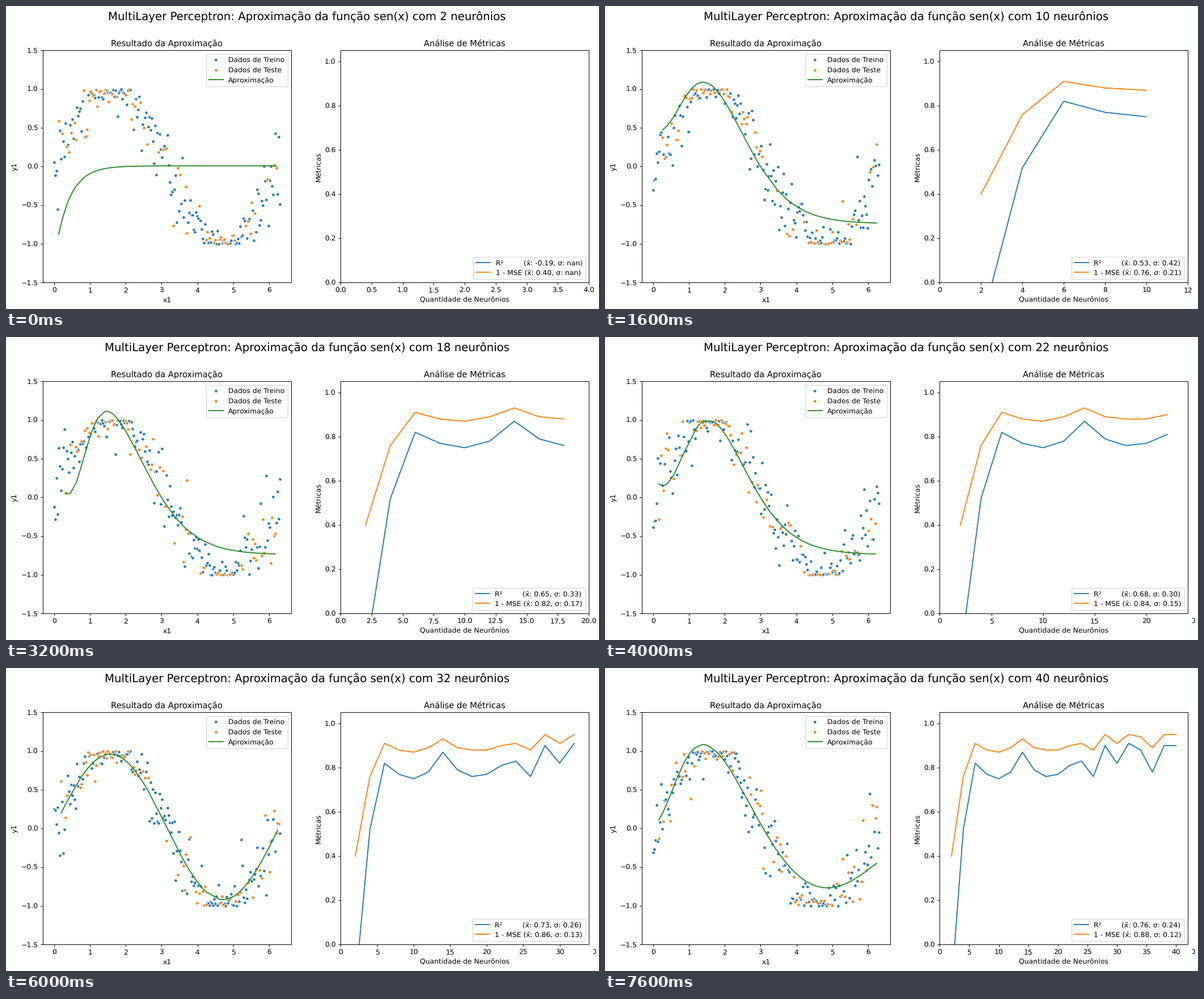
Recreate the animation shown at these times as a matplotlib script. Size 1046 by 535 pixels, loop 8000 ms.

```python
import numpy as np
import matplotlib.pyplot as plt
from matplotlib.animation import FuncAnimation
from matplotlib.transforms import Bbox

W, H, DPI = 1046, 535, 88.75
plt.rcParams.update({"font.family": "DejaVu Sans", "text.hinting": "none"})

NEURONS = np.arange(2, 41, 2)
R2 = np.array([-.19, .52, .82, .77, .75, .78, .87, .79, .76, .77,
               .81, .83, .76, .90, .82, .91, .88, .78, .90, .90])
# The sine has a variance of about one half, which ties the two metrics.
ONE_MINUS_MSE = np.round(1 - .503 * (1 - R2), 2)

X = np.linspace(0, 6.3, 200)
TEST_SIZE = 60
NOISE = .28

# How the fit changes with the network size: the dip on the left and
# the share of a true sine in the curve.
KEY_SIZES = [10, 18, 26, 32, 36, 40]
DIP_CENTRE = [.1, .35, .1, .1, -.2, 0]
DIP_DEPTH = [1.21, 1.6, 1.4, 1.4, 1.7, 1.65]
DIP_WIDTH = [.68, .5, .81, .8, .8, .6]
SINE_SHARE = [0, 0, 0, 1, 0, .4]


def approximation(n, x):
    if n == 2:
        return .008 - .753 * np.exp((.19 - x) / .4)
    centre, depth, width, share = (
        np.interp(n, KEY_SIZES, values)
        for values in (DIP_CENTRE, DIP_DEPTH, DIP_WIDTH, SINE_SHARE))
    falling = 2.5 / (1 + np.exp(1.45 * (x - 2.4))) - .74
    dip = depth * np.exp(-((x - centre) / width) ** 2 / 2)
    return (1 - share) * (falling - dip) + share * (.94 * np.sin(x) + .02)


def sample(n):
    """Noisy sine values and the mask of test points."""
    rng = np.random.default_rng(n)
    y = np.sin(X + rng.normal(0, NOISE, X.size))
    test = np.zeros(X.size, bool)
    test[rng.choice(np.arange(3, 198), TEST_SIZE, replace=False)] = True
    return y, test


def stats(values):
    std = np.std(values, ddof=1) if len(values) > 1 else np.nan
    return f"(x\u0304: {np.mean(values):.2f}, σ: {std:.2f})"


def add_axes(left):
    return fig.add_axes([left / W, 1 - 488.4 / H, 437.7 / W, 410 / H])


def draw_fit(n):
    y, test = sample(n)
    ax_fit.clear()
    for mask, color, label in ((~test, "C0", "Dados de Treino"),
                               (test, "C1", "Dados de Teste")):
        ax_fit.scatter(X[mask], y[mask], s=20, c=color, edgecolors="white",
                       linewidths=.75, label=label)
    ax_fit.plot(X[test], approximation(n, X[test]), color="forestgreen",
                label="Aproximação")
    ax_fit.set(title="Resultado da Aproximação", xlabel="x1", ylabel="y1",
               xlim=(-.315, 6.615), ylim=(-1.5, 1.5))
    ax_fit.legend(loc="upper right")


def draw_metrics(count):
    n = NEURONS[:count]
    r2, mse = R2[:count], ONE_MINUS_MSE[:count]
    ax_metrics.clear()
    ax_metrics.plot(n, r2, label="R²" + " " * 9 + stats(r2))
    ax_metrics.plot(n, mse, label="1 - MSE " + stats(mse))
    ax_metrics.set(title="Análise de Métricas", xlabel="Quantidade de Neurônios",
                   ylabel="Métricas", xlim=(0, n[-1] + 2), ylim=(0, 1.05))
    ax_metrics.legend(loc="lower right")


def update(step):
    n = int(NEURONS[step])
    heading.set_text("MultiLayer Perceptron: Aproximação da função sen(x) "
                     f"com {n} neurônios")
    draw_fit(n)
    draw_metrics(step + 1)
    leftover.set_visible(n > 18)
    return []


fig = plt.figure(figsize=(W / DPI + 1e-9, H / DPI + 1e-9), dpi=DPI, facecolor="white")
ax_fit, ax_metrics = add_axes(65.1), add_axes(590.35)
heading = fig.text(530.9 / W, 1 - 8.8 / H, "", size=16, ha="center", va="top")
# The edge of the wide "20.0" tick label stays on screen once it has appeared.
leftover = fig.text(1028 / W, 1 - 497 / H, "20.0", ha="center", va="top",
                    clip_on=True, clip_box=Bbox([[1036, 0], [W, H]]))

anim = FuncAnimation(fig, update, frames=len(NEURONS), interval=400,
                     init_func=lambda: [], repeat=True, repeat_delay=0)
plt.show()
```
